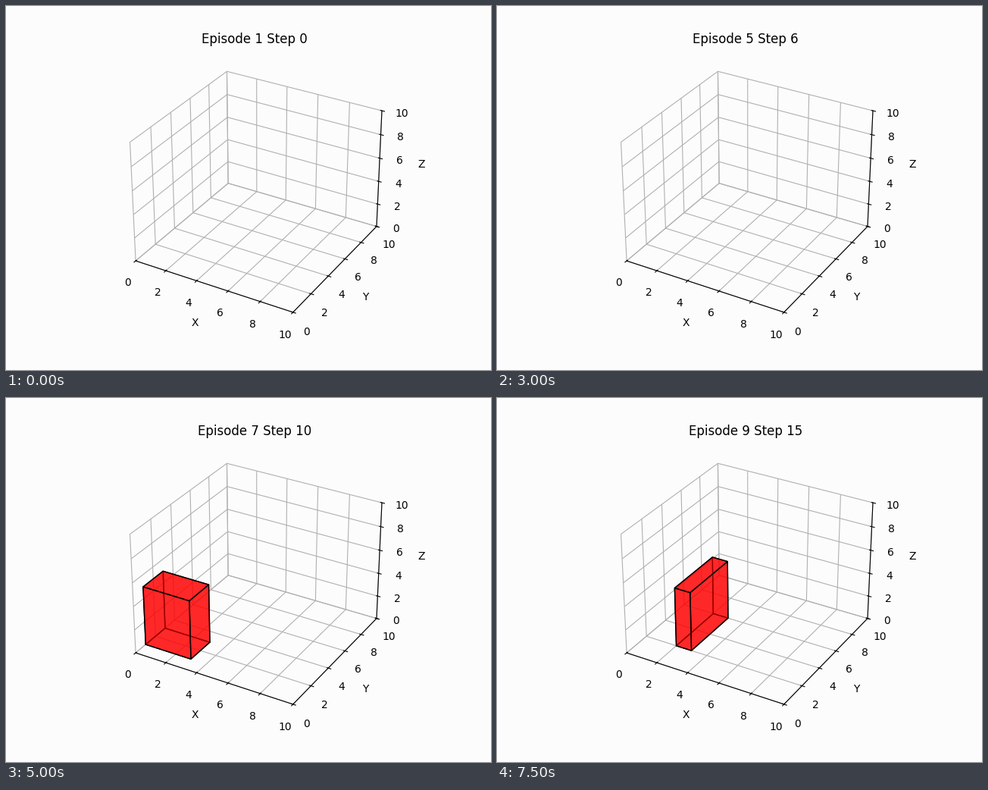
A matplotlib script that plays this animation: 640x480 px, repeating every 8 s.

```python
import matplotlib.pyplot as plt
import numpy as np
from itertools import product
from matplotlib.animation import FuncAnimation
from mpl_toolkits.mplot3d.art3d import Poly3DCollection

STEP_MS = 500
STEPS = 16
PAPER = "#fcfcfc"
COLORS = ("red", "green")

# Boxes standing on the floor, by episode: x, y, width, depth, height
PLACED = {
    4: [(3, 1, 2, 1, 4), (4, 7, 5, 3, 4)],
    6: [(2, 7, 5, 2, 1), (4, 3, 5, 3, 1)],
    7: [(0, 1, 3, 2, 5), (3, 0, 5, 3, 4)],
    8: [(5, 1, 3, 2, 3)],
    9: [(2, 2, 1, 4, 5)],
}


def state(step):
    """Each step places a box; a step with none to place ends the episode."""
    episode, start = 1, 0
    while step - start > len(PLACED.get(episode, [])):
        start += len(PLACED.get(episode, [])) + 1
        episode += 1
    return episode, PLACED.get(episode, [])[:step - start + 1]


def box_faces(x, y, w, d, h):
    """Low and high face of the box along each axis."""
    faces = []
    for axis, side in product((2, 1, 0), (0, 1)):
        ring = np.array([(0, 0), (1, 0), (1, 1), (0, 1)])
        faces.append(np.insert(ring, axis, side, axis=1) * (w, d, h) + (x, y, 0))
    return faces


fig = plt.figure(figsize=(6.4, 4.8), dpi=100, facecolor=PAPER)
ax = fig.add_subplot(projection="3d", facecolor=PAPER)
ax.set(xlim=(0, 10), ylim=(0, 10), zlim=(0, 10),
       xlabel="X", ylabel="Y", zlabel="Z")
for axis in (ax.xaxis, ax.yaxis, ax.zaxis):
    axis.set_pane_color((1, 1, 1, 0))


def update(step):
    episode, boxes = state(step)
    ax.set_title(f"Episode {episode} Step {step}")
    for old in list(ax.collections):
        old.remove()
    for box, color in zip(boxes, COLORS):
        ax.add_collection3d(Poly3DCollection(
            box_faces(*box), facecolors=color, edgecolors="black",
            linewidths=1, alpha=0.6))
    return ax.collections


anim = FuncAnimation(fig, update, frames=STEPS, interval=STEP_MS,
                     repeat=True, repeat_delay=0, blit=False)
plt.show()
```
